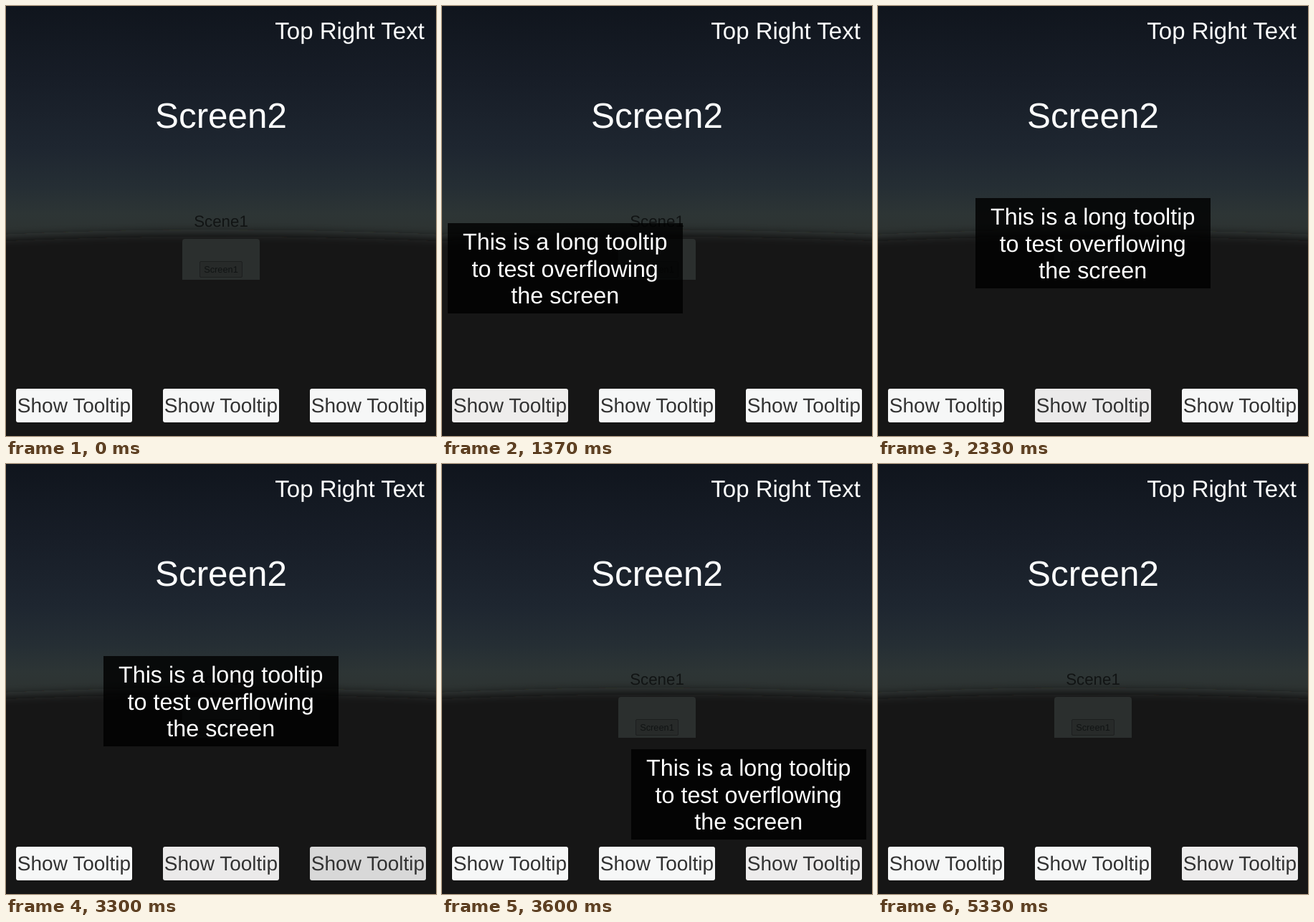
These frames come from a looping animation (600x600 px, 6900 ms). An HTML page:

```html
<!DOCTYPE html>
<html lang="en">
<head>
<meta charset="utf-8">
<title>Tooltips</title>
<style>
html, body { margin: 0; width: 100%; height: 100%; overflow: hidden; background: #161513; }
svg { display: block; width: 100vw; height: 100vh; }
text {
  font-family: "Liberation Sans", Arial, sans-serif;
  text-anchor: middle;
  text-rendering: geometricPrecision;
}
.light { fill: #fcfdfd; }
.scene { fill: #111414; }
.label { font-size: 28px; fill: #323232; }
.tip text { font-size: 32.3px; fill: #fff; }

.btn, .tip { animation: 6900ms linear infinite; }
.btn { fill: #f6f7f7; }
.b1 { animation-name: press1; }
.b2 { animation-name: press2; }
.b3 { animation-name: press3; }
.tip { animation-name: tip; opacity: 0; }

/* Each tooltip rises from its button with a quadratic ease-out. */
@keyframes tip {
  0%, 15.812% { opacity: 0; transform: translate(8px, 494px); }
  15.812% { animation-timing-function: cubic-bezier(.3333, .6667, .6667, 1); }
  19.435%, 29.724% { opacity: 1; transform: translate(8px, 303px); }
  29.725% {
    opacity: 0; transform: translate(136px, 494px);
    animation-timing-function: cubic-bezier(.3333, .6667, .6667, 1);
  }
  33.348%, 48.130% { opacity: 1; transform: translate(136px, 268px); }
  48.131% {
    opacity: 0; transform: translate(264px, 494px);
    animation-timing-function: cubic-bezier(.3333, .6667, .6667, 1);
  }
  51.754% { opacity: 1; transform: translate(264px, 398px); }
  75.145% {
    opacity: 1; transform: translate(264px, 398px);
    animation-timing-function: cubic-bezier(.3333, .6667, .6667, 1);
  }
  77.246%, 100% { opacity: 0; transform: translate(264px, 398px); }
}
@keyframes press1 {
  0%, 15.477% { fill: #f6f7f7; }
  15.478%, 15.507% { fill: #d9d9d9; }
  15.942%, 16.232% { fill: #cacaca; }
  17.681%, 29.42% { fill: #eeedec; }
  30.87%, 100% { fill: #f6f7f7; }
}
@keyframes press2 {
  0%, 29.390% { fill: #f6f7f7; }
  29.391%, 29.420% { fill: #d9d9d9; }
  29.855%, 30.145% { fill: #cacaca; }
  31.594%, 47.83% { fill: #ebeaea; }
  49.28%, 100% { fill: #f6f7f7; }
}
@keyframes press3 {
  0%, 47.796% { fill: #f6f7f7; }
  47.797%, 47.826% { fill: #d9d9d9; }
  48.261%, 48.551% { fill: #cacaca; }
  50%, 100% { fill: #edecec; }
}
</style>
</head>
<body>
<svg viewBox="0 0 600 600" preserveAspectRatio="none">
  <defs>
    <linearGradient id="sky" x2="0" y2="1">
      <stop offset="0" stop-color="#10151d"/>
      <stop offset=".17" stop-color="#171d27"/>
      <stop offset=".33" stop-color="#1e2630"/>
      <stop offset=".42" stop-color="#252e34"/>
      <stop offset=".485" stop-color="#2d3535"/>
      <stop offset=".52" stop-color="#2d3332"/>
    </linearGradient>
    <linearGradient id="ground" x2="0" y2="1">
      <stop offset="0" stop-color="#191715"/>
      <stop offset="1" stop-color="#151412"/>
    </linearGradient>
    <filter id="haze" x="-10%" y="-10%" width="120%" height="120%">
      <feGaussianBlur stdDeviation="7"/>
    </filter>
  </defs>

  <rect width="600" height="600" fill="url(#sky)"/>
  <path d="M-60 326Q300 308 660 326V680H-60Z" fill="url(#ground)" filter="url(#haze)"/>

  <text class="scene" x="300" y="308" font-size="22.3">Scene1</text>
  <path d="M246 382V329q0-4 4-4H350q4 0 4 4V382Z" fill="#2b2f2e"/>
  <rect x="270.5" y="356.5" width="59" height="22" rx="1.5" fill="#272a29" stroke="#1d1f1f"/>
  <text class="scene" x="300" y="371.7" font-size="12.8">Screen1</text>

  <text class="light" x="300" y="170.2" font-size="49.4">Screen2</text>
  <text class="light" x="479.6" y="46.2" font-size="33">Top Right Text</text>

  <rect class="btn b1" x="14" y="534" width="162" height="47" rx="3"/>
  <rect class="btn b2" x="219" y="534" width="162" height="47" rx="3"/>
  <rect class="btn b3" x="424" y="534" width="162" height="47" rx="3"/>
  <text class="label" x="95" y="567">Show Tooltip</text>
  <text class="label" x="300" y="567">Show Tooltip</text>
  <text class="label" x="505" y="567">Show Tooltip</text>

  <g class="tip">
    <rect width="328" height="126" fill="#000" fill-opacity=".8"/>
    <text x="163.7" y="37.4">This is a long tooltip</text>
    <text x="163.7" y="74.5">to test overflowing</text>
    <text x="163.7" y="111.6">the screen</text>
  </g>
</svg>
</body>
</html>
```
